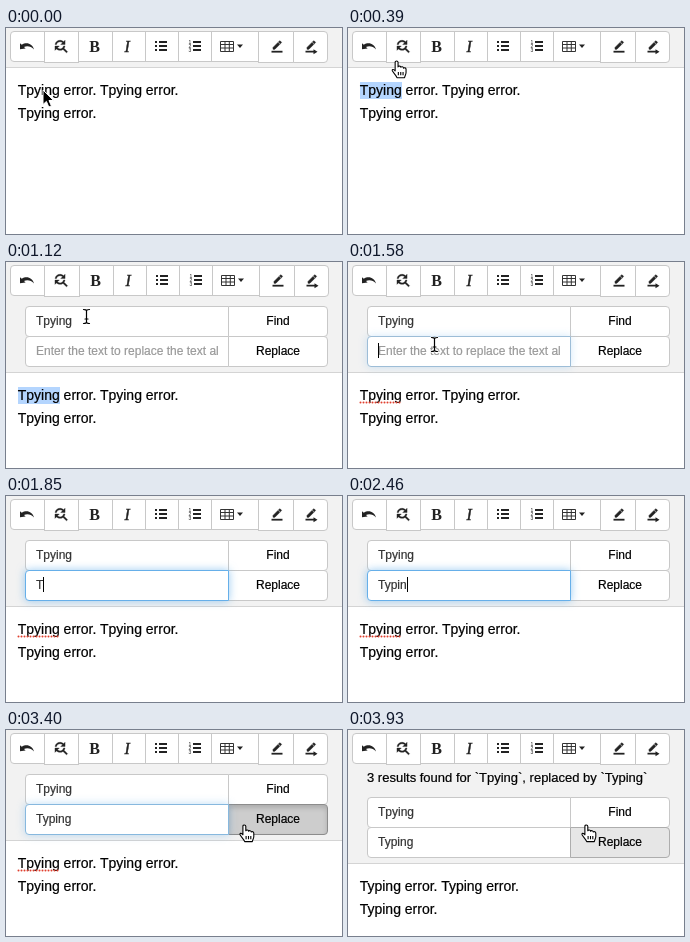
Recreate the animation shown at these times as an HTML page. Size 336 by 206 pixels, loop 3990 ms.

```html
<!DOCTYPE html>
<html lang="en">
<head>
<meta charset="utf-8">
<title>Find and replace</title>
<style>
  html, body { margin: 0; width: 100%; height: 100%; overflow: hidden; background: #fff; }
  #stage { position: relative; width: 336px; height: 206px; overflow: hidden; background: #fff;
    font: 12px/30px "Liberation Sans", Arial, sans-serif; color: #000; white-space: pre;
    -webkit-text-stroke: .2px; }
  #stage * { box-sizing: border-box; }
  #stage div, svg { position: absolute; }
  #head, #tools, #panel { left: 0; top: 0; width: 336px; }
  #head { background: #f2f2f2; border-bottom: 1px solid #d4d4d4; }
  .btn { background: #fff; border: 1px solid #c8c8c8; }
  .btn.hover { background: #e6e6e6; border-color: #adadad; z-index: 1; }
  .btn.down { background: #cdcdcd; border-color: #8c8c8c; z-index: 1;
    box-shadow: inset 0 3px 5px rgba(0, 0, 0, .16); }
  .tool { top: 3px; height: 31px; }
  .tool.tall { height: 32px; }
  .field { left: 19px; width: 204px; height: 31px; background: #fff; border: 1px solid #c8c8c8;
    border-radius: 4px 0 0 4px; padding-left: 10px; line-height: 29px; color: #333; }
  .field span { display: block; width: 183px; overflow: hidden; }
  .act { left: 222px; width: 100px; height: 31px; text-align: center; line-height: 29px;
    border-radius: 0 4px 4px 0; }
  #caret { width: 1px; height: 15px; top: 6px; background: #000; }
  #note { left: 19px; top: 33px; font-size: 13px; }
  #sel { left: 12px; width: 42px; height: 17px; background: #b4d5fe; }
  #text { left: 11.7px; font-size: 14px; line-height: 23px; }
  svg { left: 0; top: 0; overflow: visible; }
  #icons, #cursors { -webkit-text-stroke: 0; }
  #cursors { z-index: 5; }
</style>
</head>
<body>
<div id="stage">
  <div id="head"></div>
  <div id="tools"></div>
  <svg width="336" height="40" fill="#222">
    <defs>
      <path id="pen" stroke="#222" d="M17.75 7 14 3.25l-10 10V17h3.75zM20.71 4.04c.39-.39.39-1.02 0-1.41L18.37.29c-.39-.39-1.02-.39-1.41 0L15 2.25 18.75 6z"/>
    </defs>
    <path d="M14 15.2 15.8 16.8C20.5 13.6 26.5 15.6 28 21.6 25.2 18.4 21.4 17.6 18 19L19.6 20.6 14 21.2Z"/>
    <path transform="translate(46.1 9.4) scale(.72)" stroke="#222" stroke-width=".5" d="M11 6c1.38 0 2.63.56 3.54 1.46L12 10h6V4l-2.05 2.05C14.68 4.78 12.93 4 11 4 7.47 4 4.57 6.61 4.08 10H6.1C6.56 7.72 8.58 6 11 6zM16.64 15.14c.66-.9 1.12-1.97 1.28-3.14H15.9c-.46 2.28-2.48 4-4.9 4-1.38 0-2.63-.56-3.54-1.46L10 12H4v6l2.05-2.05C7.32 17.22 9.07 18 11 18c1.55 0 2.98-.51 4.14-1.36L20 21.49 21.49 20z"/>
    <g id="icons">
      <g font-family="Liberation Serif, serif" font-size="16" font-weight="bold">
        <text x="83.3" y="23.5">B</text>
        <text x="118.5" y="23.5" font-style="italic" font-weight="normal" stroke="#222" stroke-width=".4">I</text>
      </g>
      <path d="M149 13h2v2h-2zM149 17h2v2h-2zM149 21h2v2h-2zM153 13h8v2h-8zM153 17h8v2h-8zM153 21h8v2h-8z"/>
      <path d="M187 13h8v2h-8zM187 17h8v2h-8zM187 21h8v2h-8z"/>
      <g font-family="Liberation Sans, sans-serif" font-size="5">
        <text x="182.5" y="15.5">1</text><text x="182.5" y="19.9">2</text><text x="182.5" y="24.3">3</text>
      </g>
      <path d="M214.5 13.5h13v10h-13zM214.5 16.5h13M214.5 20h13M219 13.5v10M223.3 13.5v10" fill="none" stroke="#333"/>
      <path d="M231 16.5h6l-3 3.6z"/>
      <use href="#pen" transform="translate(265 12.8) scale(.5)"/>
      <path d="M265.5 22.8h11v1.8h-11z"/>
      <use href="#pen" transform="translate(299 12.8) scale(.5)"/>
      <path d="M299.5 22.8h8v-1.6l4 2.5-4 2.5v-1.6h-8z"/>
    </g>
  </svg>

  <div id="panel">
    <div class="field" style="top:44px">Tpying</div>
    <div class="btn act" style="top:44px">Find</div>
    <div class="btn act" id="swap" style="top:74px">Replace</div>
    <div class="field" id="to" style="top:74px"><span id="typed"></span><div id="caret"></div></div>
  </div>
  <div id="note">3 results found for `Tpying`, replaced by `Typing`</div>

  <div id="sel"></div>
  <div id="text"></div>
  <svg id="wave" width="60" height="4">
    <path d="M12.5 1.5H54" stroke="#e0402f" stroke-width="2" stroke-linecap="round" stroke-dasharray="0 3"/>
  </svg>

  <svg id="cursors" width="336" height="206" stroke-linejoin="round">
    <defs>
      <path id="stem" d="M-3-7C-1-7 0-6.5 0-5.5 0-6.5 1-7 3-7M0-5.5V5.5M-3 7C-1 7 0 6.5 0 5.5 0 6.5 1 7 3 7M-1.5 2.5h3"/>
    </defs>
    <path id="arrow" d="M0 0V14.5L3.4 11.4 5.8 17 8.4 15.9 6 10.5H10.6Z" fill="#000" stroke="#fff"/>
    <g id="hand" stroke="#000" stroke-width="1.1">
      <path d="M-1.6 9.8V1.2C-1.6-.5 1.2-.5 1.3 1.2V5.8C1.6 4.6 4 4.7 4.1 6.2 4.7 5.2 6.7 5.6 6.8 7 7.5 6.2 9.3 6.8 9.3 8.2V11.4C9.3 13.4 8.2 14.4 7.8 16.6H.2C-.6 14.2-3.2 12-4.3 10-5.2 8.2-3.2 7.5-1.6 9.8Z" fill="#fff"/>
      <path d="M1.6 11v3.2M4 11v3.2M6.3 11v3.2" fill="none"/>
    </g>
    <g id="beam" fill="none" stroke-linecap="round">
      <use href="#stem" stroke="#fff" stroke-width="2.4"/>
      <use href="#stem" stroke="#000" stroke-width="1.2"/>
    </g>
  </svg>
</div>
<script>
const LOOP = 3990;
const AT = { select: 130, hover: 450, press: 580, open: 650, settle: 1170, focus: 1515,
  type: 1770, wake: 2720, over: 3190, push: 3350, done: 3520 };

// time, x, y of the pointer's hot spot
const PATH = [[0, 37, 62], [190, 37, 62], [530, 55.5, 16.5], [690, 55.5, 16.5], [1110, 80.5, 54.5],
  [1240, 80.5, 54.5], [1510, 86.5, 82.5], [2720, 86.5, 82.5], [3210, 238.5, 95]];
const KEYS = [[1770, 'T'], [2110, 'Ty'], [2250, 'Typi'], [2450, 'Typin'], [2580, 'Typing']];
// left edge, width, one pixel taller
const TOOLS = [[4, 35], [38, 35, 1], [72, 35], [106, 34], [139, 34], [172, 34], [205, 48], [252, 36, 1], [287, 35, 1]];

const $ = id => document.getElementById(id);
const show = (el, on) => { el.style.display = on ? '' : 'none'; };
const clamp = v => Math.max(0, Math.min(1, v));
const ease = v => v * v * (3 - 2 * v);
const setText = (el, s) => { if (el.textContent !== s) el.textContent = s; };

const tools = TOOLS.map(([x, w, tall], i) => {
  const el = document.createElement('div');
  el.className = 'btn tool' + (tall ? ' tall' : '');
  el.style.left = x + 'px';
  el.style.width = w + 'px';
  if (i === 0) el.style.borderRadius = '4px 0 0 4px';
  if (i === TOOLS.length - 1) el.style.borderRadius = '0 4px 4px 0';
  $('tools').append(el);
  return el;
});

// measures the typed text in the field's own font
const ruler = document.createElement('canvas').getContext('2d');
ruler.font = '12px "Liberation Sans", Arial, sans-serif';

function pointer(t) {
  let i = PATH.length - 1;
  while (PATH[i][0] > t) i--;
  const [t0, x0, y0] = PATH[i], [t1, x1, y1] = PATH[i + 1] || [LOOP, x0, y0];
  const k = ease(clamp((t - t0) / (t1 - t0)));
  return [x0 + (x1 - x0) * k, y0 + (y1 - y0) * k];
}

function drawPointer(t, open) {
  const [x, y] = pointer(t);
  const kind = y < 37 || x > 222 ? 'hand' : open ? 'beam' : 'arrow';
  const visible = t < AT.type || t >= AT.wake;
  for (const id of ['arrow', 'hand', 'beam']) {
    show($(id), visible && id === kind);
    $(id).setAttribute('transform', `translate(${x} ${y})`);
  }
}

function drawTools(t) {
  const shift = t >= AT.hover && t < AT.settle ? 1 : 0;
  const state = t >= AT.press && t < AT.open ? ' down' : t >= AT.hover && t < AT.open + 100 ? ' hover' : '';
  tools.forEach((el, i) => { if (i > 1) el.style.left = TOOLS[i][0] + shift + 'px'; });
  tools[1].style.width = TOOLS[1][1] + shift + 'px';
  tools[1].className = 'btn tool tall' + state;
  $('icons').setAttribute('transform', `translate(${shift} 0)`);
}

function drawPanel(t) {
  const typed = KEYS.reduce((s, [at, word]) => t >= at ? word : s, '');
  const glow = clamp((t - AT.focus) / 150) * (1 - clamp((t - AT.push) / 150));
  const mix = (a, b) => Math.round(a + (b - a) * glow);
  const field = $('to');
  setText($('typed'), typed || 'Enter the text to replace the text al');
  $('typed').style.color = typed ? '#333' : '#999';
  field.style.borderColor = `rgb(${mix(200, 102)},${mix(200, 175)},${mix(200, 233)})`;
  field.style.boxShadow = `0 0 8px rgba(102,175,233,${.65 * glow})`;
  field.style.zIndex = glow > 0 ? 2 : 0;
  show($('caret'), t >= AT.focus && t < AT.push);
  $('caret').style.left = 10 + Math.round(ruler.measureText(typed).width) + 'px';
  $('swap').className = 'btn act' +
    (t >= AT.push && t < AT.done ? ' down' : t >= AT.over ? ' hover' : '');
}

function render(t) {
  const open = t >= AT.open, done = t >= AT.done;
  const height = done ? 134 : open ? 111 : 40;
  const word = done ? 'Typing' : 'Tpying';
  $('head').style.height = height + 'px';
  show($('panel'), open);
  show($('note'), done);
  $('panel').style.top = done ? '23px' : '0';
  $('text').style.top = height + 11 + 'px';
  $('sel').style.top = height + 14 + 'px';
  $('wave').style.top = height + 28 + 'px';
  setText($('text'), `${word} error. ${word} error.\n${word} error.`);
  show($('sel'), t >= AT.select && t < AT.focus);
  show($('wave'), t >= AT.focus && !done);
  drawTools(t);
  drawPanel(t);
  drawPointer(t, open);
}

const start = performance.now();
function tick(now) {
  render(Math.max(0, now - start) % LOOP);
  requestAnimationFrame(tick);
}
render(0);
requestAnimationFrame(tick);
</script>
</body>
</html>
```
